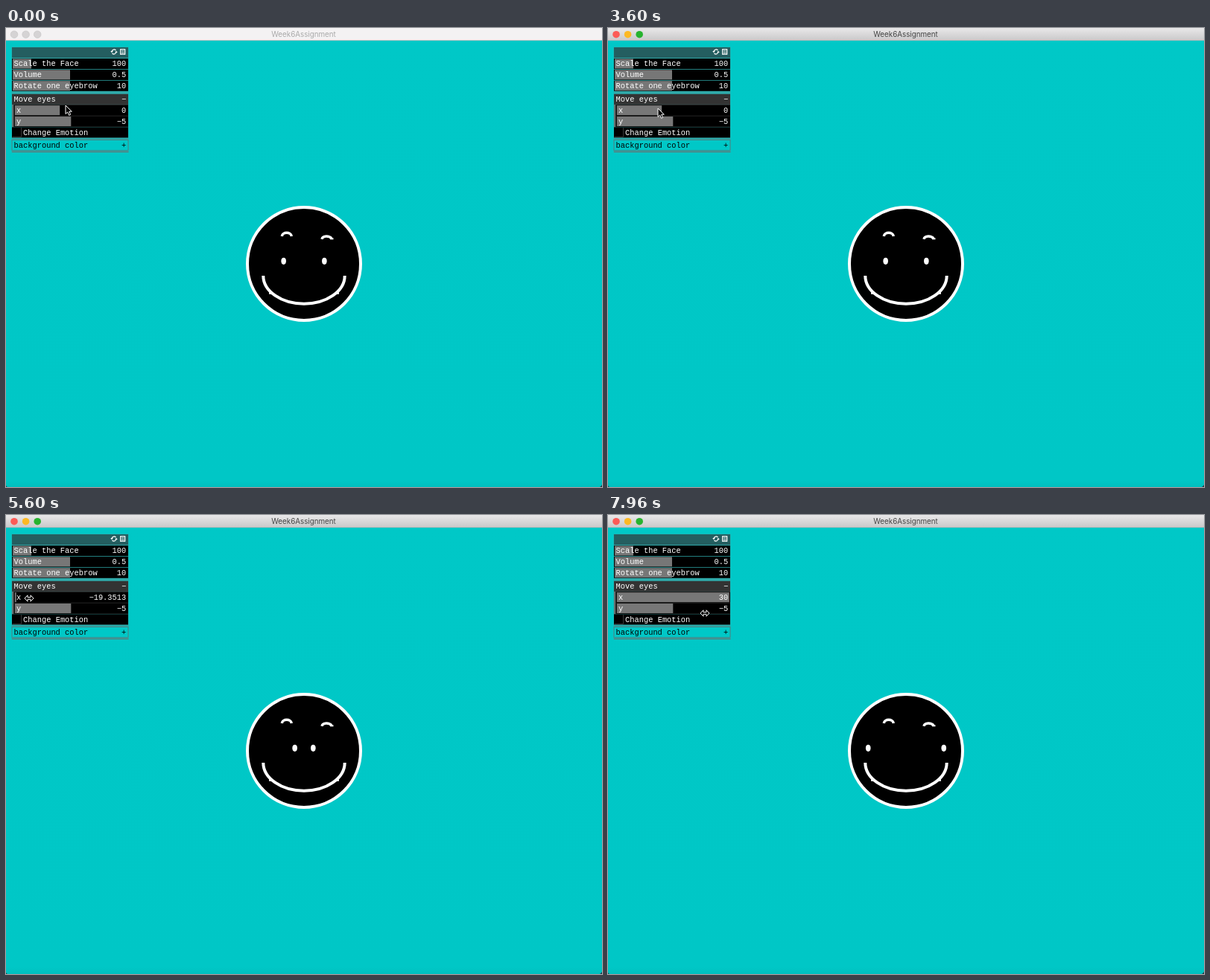
An HTML page that plays this animation: 800 by 617 pixels, repeating every 8 s.

```html
<!DOCTYPE html>
<html lang="en">
<head>
<meta charset="utf-8">
<title>Week6Assignment</title>
<style>
  html, body { margin: 0; width: 100%; height: 100%; overflow: hidden; background: #00c8c7; }
  svg { display: block; width: 100vw; height: 100vh; }
  #panel text { font: 10.4px "Liberation Mono", monospace; fill: #fff; }
  #panel text.dark { fill: #000; }
  #title { font: 9.8px Inter, sans-serif; text-anchor: middle; fill: #a9a9a9; }
  .active #title { fill: #444; }
  #lights circle { fill: #d5d3d4; stroke: #c3c1c2; stroke-width: .6; }
  .active #lights circle { stroke: none; }
  .active #lights :nth-child(1) { fill: #fc5b57; }
  .active #lights :nth-child(2) { fill: #fdb924; }
  .active #lights :nth-child(3) { fill: #28b32f; }
  #bar { fill: #f4f2f3; }
  .active #bar { fill: url(#metal); }
  .end { text-anchor: end; }
</style>
</head>
<body>
<svg id="stage" viewBox="0 0 800 617" preserveAspectRatio="none">
  <defs>
    <linearGradient id="metal" x2="0" y2="1">
      <stop stop-color="#e9e8e9"/><stop offset="1" stop-color="#c9c8c9"/>
    </linearGradient>
    <linearGradient id="sea" x2="0" y2="1">
      <stop stop-color="#00c8c7"/><stop offset=".985" stop-color="#00c7c6"/><stop offset="1" stop-color="#00bfbe"/>
    </linearGradient>
  </defs>
  <rect width="800" height="617" fill="url(#sea)"/>
  <path d="M0 615V617H2Q.5 616.500 0 615ZM800 614V617H797Q799 616 800 614Z" fill="#234"/>

  <rect id="bar" width="800" height="17"/>
  <rect y="16" width="800" height="1" fill="#b5b3b4" opacity=".7"/>
  <g id="lights">
    <circle cx="11" cy="8.7" r="4.8"/><circle cx="26.600" cy="8.7" r="4.8"/><circle cx="42.200" cy="8.7" r="4.8"/>
  </g>
  <text id="title" x="399.500" y="12.300">Week6Assignment</text>

  <g id="face" fill="none" stroke="#fff" stroke-width="4">
    <circle cx="400" cy="317" r="76" fill="#000"/>
    <path d="M370.300 280C371 273.800 382.500 273.800 383.300 280" stroke-width="3.500"/>
    <path d="M424 283.800C425 278.800 434 279 437 283" stroke-width="3.500"/>
    <path d="M435 283.300H439.500" stroke-width="2"/>
    <path d="M345.300 333A54.700 37.700 0 0 0 454.700 333"/>
    <path d="M353 356.500H356M444 356.500H447" stroke-width="2.500"/>
    <g fill="#fff" stroke="none">
      <ellipse id="leftEye" cy="313.300" rx="3.300" ry="4.600"/>
      <ellipse id="rightEye" cy="313.300" rx="3.300" ry="4.600"/>
    </g>
  </g>

  <g id="panel">
    <rect x="7.500" y="25.500" width="157" height="142" fill="#2fa9a9"/>
    <rect x="8" y="26" width="156" height="14" fill="#245e60"/>
    <g fill="none" stroke="#fff" stroke-width="1.200">
      <path d="M142 31.500A3.200 3.200 0 0 1 147.500 30M148 32.500A3.200 3.200 0 0 1 142.500 34"/>
      <path d="M140.200 31H143.800L142 33.200ZM146.200 33H149.800L148 30.800Z" fill="#fff" stroke="none"/>
      <rect x="153.700" y="28.700" width="6" height="6.600"/>
      <path d="M155 31H158.500M155 33.500H158.500"/>
    </g>
  </g>

  <g id="cursor" fill="#000" stroke="#fff" stroke-width="1" stroke-linejoin="round">
    <path id="arrow" d="M0 0V11.500L2.700 9L4.600 13.300L6.600 12.400L4.800 8.200H8.300Z"/>
    <path id="resize" d="M-6 0L-2 -4.200V-1.300H2V-4.200L6 0L2 4.200V1.300H-2V4.200Z"/>
  </g>
</svg>
<script>
const LOOP = 8000, STEP = 40;
const ACTIVATE = 2160, DRAG_FROM = 4120, DRAG_TO = 6500, RESIZE_FROM = 4960;
const INPUT_LAG = 50, EYE_EASE = 1 - Math.exp(-STEP / 300);
const SCALE = 800 / 1024, EYE_OFFSET = 35;
const TRACK = { x: 12, width: 151, min: -20, max: 30 };

// time, x, y of the pointer
const POINTER = [
  [0, 80, 104], [200, 79, 104], [900, 61, 111], [2300, 61, 111],
  [3000, 67, 108], [3700, 67, 108], [4070, 72.4, 110],
  [4710, 26.135, 113], [4760, 23, 113], [4960, 4, 113], [5400, 4, 112],
  [5550, 13.959, 112], [5600, 31, 112], [5990, 163, 115], [6100, 190, 116],
  [6800, 190, 116], [7700, 130, 132], [8000, 130, 132]
];

const $ = id => document.getElementById(id);
const panel = $("panel");
const withMinus = value => String(value).replace("-", "\u2212");

function add(tag, attrs, text = "") {
  const node = document.createElementNS("http://www.w3.org/2000/svg", tag);
  for (const key in attrs) node.setAttribute(key, attrs[key]);
  node.textContent = text;
  return panel.appendChild(node);
}

function row(y, label, value, { x = 8, bg = "#000", fill = 0, textX = x + 2.5, dark = false } = {}) {
  const cls = dark ? "dark" : "";
  add("rect", { x, y, width: 164 - x, height: 14.1, fill: bg });
  const bar = add("rect", { x: x + 1, y: y + .5, width: fill, height: 13, fill: "#777" });
  add("text", { x: textX, y: y + 10.4, class: cls }, label);
  const number = add("text", { x: 161.3, y: y + 10.4, class: cls + " end" }, withMinus(value));
  return { bar, number };
}

row(41, "Scale the Face", 100, { fill: 25 });
row(55.85, "Volume", 0.5, { fill: 77 });
row(70.7, "Rotate one eyebrow", 10, { fill: 77 });
row(88.8, "Move eyes", "-", { bg: "#333" });
add("rect", { x: 8, y: 103, width: 156, height: 30, fill: "#333" });
add("rect", { x: 8, y: 103, width: 2, height: 30, fill: "#667070" });
const slider = row(103.65, "x", 0, { x: 10.8, textX: 14 });
row(118.5, "y", -5, { x: 10.8, fill: 75.5, textX: 14 });
row(133.3, "Change Emotion", "", { textX: 23 });
add("path", { d: "M8.5 146.500H20.500V134", fill: "none", stroke: "#454545", "stroke-width": .8 });
row(151, "background color", "+", { bg: "#00c8c7", dark: true });
add("rect", { x: 8, y: 150.5, width: 156, height: 14, fill: "none", stroke: "#527b7c", "stroke-width": .8 });
add("path", { d: "M8 166.500H164.500", fill: "none", stroke: "#5d7474", "stroke-width": 1 });

function pointerAt(t) {
  const i = Math.max(1, POINTER.findIndex(p => p[0] >= t));
  const [t0, x0, y0] = POINTER[i - 1], [t1, x1, y1] = POINTER[i];
  const k = (t - t0) / (t1 - t0);
  return [x0 + (x1 - x0) * k, y0 + (y1 - y0) * k];
}

function valueAt(t) {
  if (t < DRAG_FROM) return 0;
  const [x] = pointerAt(Math.min(t, DRAG_TO) - INPUT_LAG);
  const v = TRACK.min + (x - TRACK.x) / TRACK.width * (TRACK.max - TRACK.min);
  return Math.min(TRACK.max, Math.max(TRACK.min, v));
}

// The eyes trail behind the slider, so their path is worked out once.
const eyePath = [];
for (let t = 0, eye = 0; t < LOOP; t += STEP) {
  eye += (valueAt(t) - eye) * EYE_EASE;
  eyePath.push(eye);
}

function draw(now) {
  const step = Math.floor((now % LOOP) / STEP), t = step * STEP;
  const [x, y] = pointerAt(t), value = valueAt(t);
  const spread = SCALE * (EYE_OFFSET + eyePath[step]);
  const resizing = t >= RESIZE_FROM;

  $("stage").classList.toggle("active", t >= ACTIVATE);
  $("leftEye").setAttribute("cx", 400 - spread);
  $("rightEye").setAttribute("cx", 400 + spread);
  slider.bar.setAttribute("width", (value - TRACK.min) / (TRACK.max - TRACK.min) * TRACK.width);
  slider.number.textContent = withMinus(+value.toPrecision(6));
  $("cursor").setAttribute("transform", `translate(${x} ${y})`);
  $("arrow").style.display = resizing ? "none" : "";
  $("resize").style.display = resizing ? "" : "none";
}

const start = performance.now();
function tick() {
  draw(performance.now() - start);
  requestAnimationFrame(tick);
}
tick();
</script>
</body>
</html>
```
